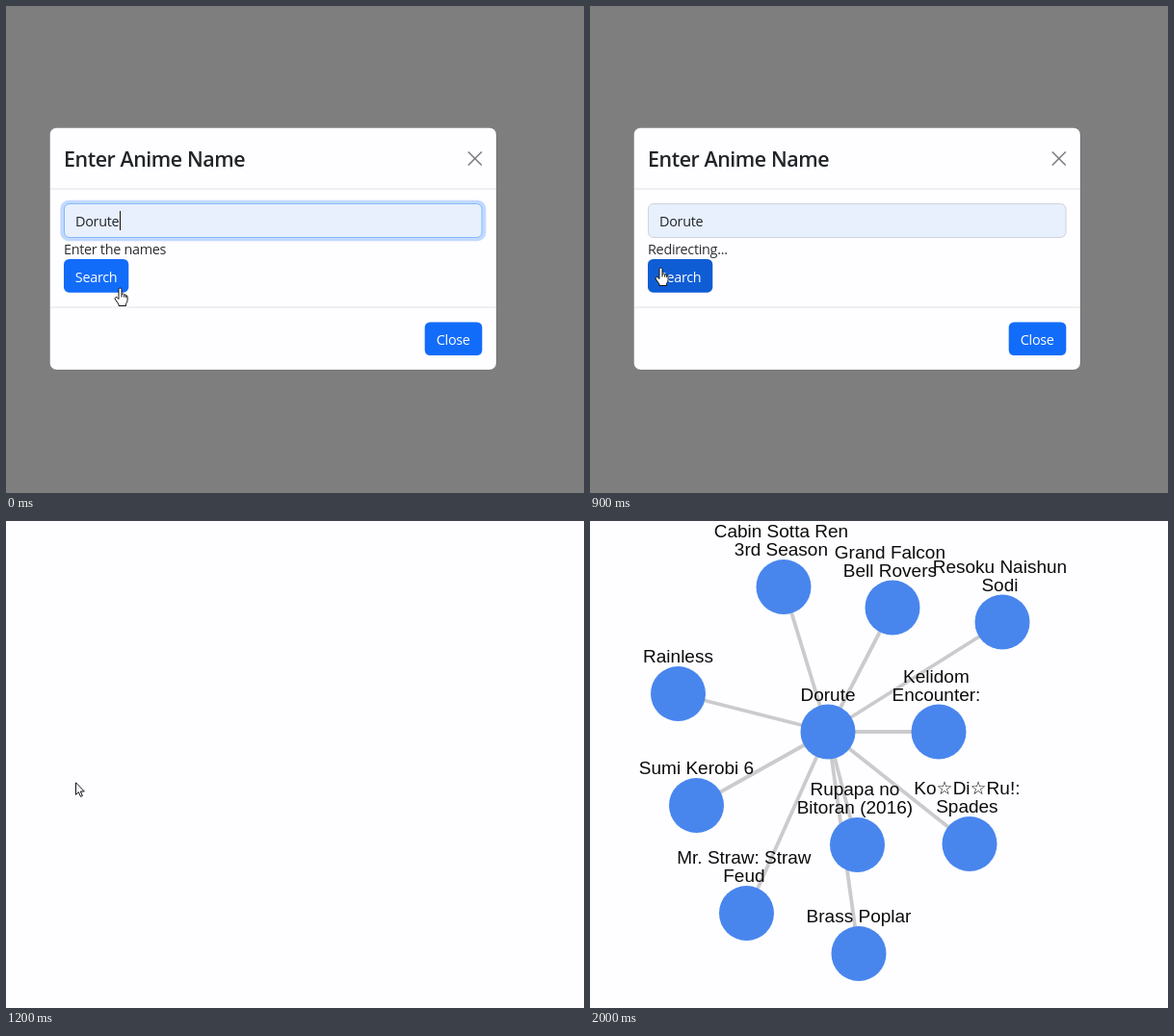
Animation, 600 px wide and 506 px high, one loop 3 s. Source, as an HTML page with a canvas:

```html
<!DOCTYPE html>
<html lang="en">
<head>
<meta charset="utf-8">
<title>Name search</title>
<style>
  html, body { margin: 0; width: 100%; height: 100%; overflow: hidden; background: #fefdff; }
  canvas { display: block; }
</style>
</head>
<body>
<canvas id="stage" width="600" height="506"></canvas>
<script>
const W = 600, H = 506, LOOP = 3000, STEP = 100;
const PAGE = '#fefdff', BLUE = '#126cfa', INK = '#212529';
const UI = '"Open Sans", "Noto Sans", sans-serif';
const LABEL = '19px "Liberation Sans", "DejaVu Sans", sans-serif';
const QUERY = 'Dorute';
const FADE_START = 986, FADE = 150, SLIDE = 300;
const NODE_R = 28.5;

const hub = { x: 247, y: 219, lines: [QUERY] };
const leaves = [
  [201, 68.5, 'Cabin Sotta Ren', '3rd Season'],
  [314, 90, 'Grand Falcon', 'Bell Rovers'],
  [428, 105, 'Resoku Naishun', 'Sodi'],
  [91.5, 179.5, 'Rainless'],
  [362, 219, 'Kelidom', 'Encounter:'],
  [110.5, 295.5, 'Sumi Kerobi 6'],
  [277.5, 336.5, 'Rupapa no', 'Bitoran (2016)'],
  [394, 335.5, 'Ko☆Di☆Ru!:', 'Spades'],
  [162.5, 407.5, 'Mr. Straw: Straw', 'Feud'],
  [279, 449.5, 'Brass Poplar']
].map(([x, y, ...lines]) => ({ x, y, lines }));

const HAND = new Path2D('M-1.5 9V1Q-1.5-.4 0-.4T1.5 1V6Q3.2 4.8 4.2 6.5Q5.6 5.7 6.2 7.3' +
  'Q7.6 7 7.6 9V12Q7.6 14 6 16V18H-1.5V16.5L-5 11.6Q-6 9.3-4.6 9Q-3.2 8.8-1.5 11Z');
const KNUCKLES = new Path2D('M1.5 6V9M4.2 6.6V9.2M6.2 7.5V9.6');
const ARROW = new Path2D('M0 0V12.6L2.9 9.9L5 14.6L6.9 13.7L4.9 9.2H8.8Z');

const screen = document.getElementById('stage').getContext('2d');
const layer = document.createElement('canvas');
layer.width = W;
layer.height = H;
const panel = layer.getContext('2d');

const clamp = v => Math.min(1, Math.max(0, v));
const smooth = v => v * v * (3 - 2 * v);

function box(c, x, y, w, h, r, fill, stroke) {
  c.beginPath();
  c.roundRect(x, y, w, h, r);
  if (fill) { c.fillStyle = fill; c.fill(); }
  if (stroke) { c.strokeStyle = stroke; c.lineWidth = 1; c.stroke(); }
}

function line(c, x1, y1, x2, y2, color, width) {
  c.strokeStyle = color;
  c.lineWidth = width;
  c.beginPath();
  c.moveTo(x1, y1);
  c.lineTo(x2, y2);
  c.stroke();
}

function uiText(c, str, x, y, color = INK, align = 'left', font = '14.4px ') {
  c.font = font + UI;
  c.letterSpacing = font.includes('600') ? '-0.43px' : '-0.29px';
  c.textAlign = align;
  c.fillStyle = color;
  c.fillText(str, x, y);
}

function drawDialog(c, t) {
  c.clearRect(0, 0, W, H);
  box(c, 45.5, 126.5, 463.5, 251.5, 7, PAGE, 'rgba(0,0,0,0.17)');

  uiText(c, 'Enter Anime Name', 60, 166.5, INK, 'left', '600 21.4px ');
  c.lineCap = 'round';
  line(c, 480.3, 152, 493.3, 165, '#7f7e80', 1.7);
  line(c, 493.3, 152, 480.3, 165, '#7f7e80', 1.7);
  c.lineCap = 'butt';
  line(c, 46, 190, 508.5, 190, '#dee2e6', 1);
  line(c, 46, 313, 508.5, 313, '#dee2e6', 1);

  const focus = t < 800 ? 1 : t < 900 ? 0.4 : 0;
  if (focus) box(c, 56.3, 201.8, 442, 42.4, 9, `rgba(13,110,253,${0.25 * focus})`);
  box(c, 60.5, 205.5, 433.5, 35, 5.5, '#e8f0fe', focus > 0.5 ? '#86b7fe' : '#ced4da');
  uiText(c, QUERY, 72, 229);
  if (t < 400) line(c, 118.5, 213, 118.5, 233, '#111', 1);

  uiText(c, t < 900 ? 'Enter the names' : 'Redirecting...', 60, 257.5, '#2b2e32');

  const search = t < 100 ? BLUE : t === 800 ? '#0a58ca' : '#0f5dd5';
  box(c, 60, 263, 67.3, 34.7, 5.5, search);
  uiText(c, 'Search', 93.6, 286.5, '#fff', 'center');
  box(c, 434.7, 328.4, 59.6, 34.7, 5.5, BLUE);
  uiText(c, 'Close', 464.2, 352, '#fff', 'center');
}

function drawCursor(c, path, x, y) {
  c.save();
  c.translate(x, y);
  c.lineJoin = 'round';
  c.lineWidth = 1;
  c.fillStyle = '#fff';
  c.strokeStyle = '#111';
  c.fill(path);
  c.stroke(path);
  if (path === HAND) c.stroke(KNUCKLES);
  c.restore();
}

function drawNode(c, { x, y, lines }) {
  c.fillStyle = '#4886ee';
  c.beginPath();
  c.arc(x, y, NODE_R, 0, Math.PI * 2);
  c.fill();

  // wrapped labels sit half a space left of the node
  const cx = lines.length > 1 ? x - 2.6 : x;
  c.font = LABEL;
  c.textAlign = 'center';
  c.fillStyle = '#0c0c0c';
  lines.forEach((str, i) =>
    c.fillText(str, cx, y - NODE_R - 4 - 19 * (lines.length - 1 - i)));
}

function drawGraph(c) {
  for (const n of leaves) line(c, hub.x, hub.y, n.x, n.y, '#cbcacc', 3.8);
  [hub, ...leaves].forEach(n => drawNode(c, n));
}

function drawSearch(c, t) {
  const since = Math.max(0, t - FADE_START);
  const alpha = 1 - clamp(since / FADE);
  const lift = 50 * (1 - Math.pow(1 - clamp(since / SLIDE), 1.57));
  c.fillStyle = `rgba(0,0,0,${0.5 * alpha})`;
  c.fillRect(0, 0, W, H);

  drawDialog(panel, t);
  c.globalAlpha = alpha;
  c.drawImage(layer, 0, -lift);
  c.globalAlpha = 1;

  const move = smooth(clamp(t / 500));
  drawCursor(c, HAND, 118.5 - 45 * move, 293.5 - 21 * move);
}

function render(t) {
  screen.fillStyle = PAGE;
  screen.fillRect(0, 0, W, H);
  if (t < 1200) drawSearch(screen, t);
  else if (t < 1300) drawCursor(screen, ARROW, 72.5, 271.8);
  else drawGraph(screen);
}

const start = performance.now();
function tick() {
  const t = (performance.now() - start) % LOOP;
  render(Math.floor(t / STEP) * STEP);
  requestAnimationFrame(tick);
}
tick();
</script>
</body>
</html>
```
